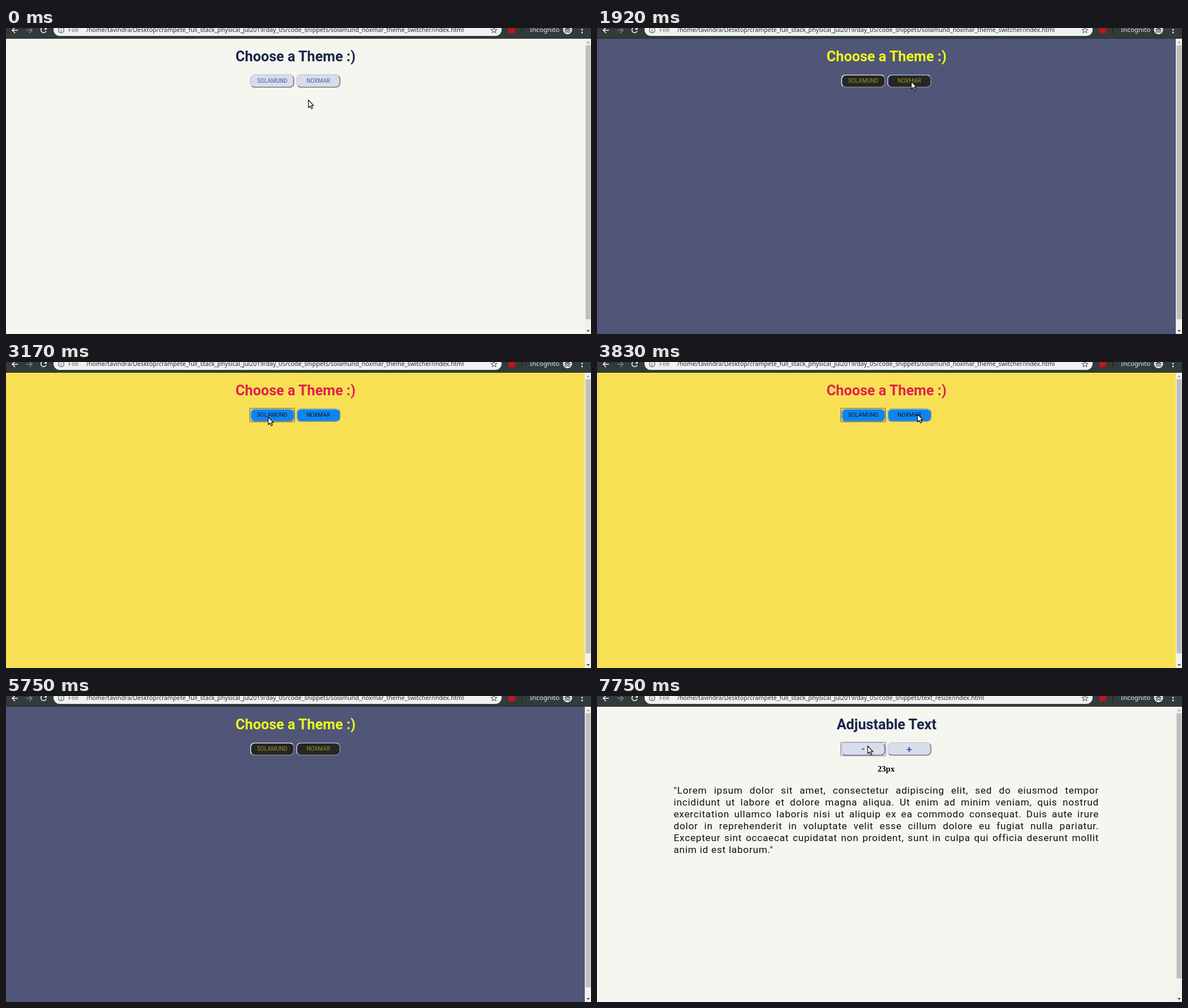
An HTML page with a canvas for the animation above (8 s loop, 1034 px wide and 542 px high).

```html
<!DOCTYPE html>
<html lang="en">
<head>
<meta charset="utf-8">
<title>Theme switcher</title>
<style>
  html, body { margin: 0; width: 1034px; height: 542px; overflow: hidden; }
  canvas, svg { position: absolute; left: 0; top: 0; }
  text { white-space: pre; }
  .bar { font-family: "Noto Sans", sans-serif; }
  .title { font: 700 25.2px Roboto, sans-serif; }
  .label { font: 400 10px Roboto, sans-serif; }
  .sign { font: 700 17px Roboto, sans-serif; }
  .size { font: 700 14.6px "Liberation Serif", serif; }
  .body { font-family: Roboto, sans-serif; letter-spacing: .042em; fill: #111; }
</style>
</head>
<body>
<canvas id="stage" width="1034" height="542"></canvas>
<svg id="layer" width="1034" height="542" viewBox="0 0 1034 542"></svg>
<script>
const LOOP = 8000;
const ctx = document.getElementById('stage').getContext('2d');
const layer = document.getElementById('layer');

const themes = {
  light: { bg: '#f5f6f0', title: '#192549', btn: '#d9dcea', label: '#3f61a5',
           lit: '#d9dae2', dark: '#777780', ring: '#7286b4' },
  night: { bg: '#515578', title: '#eaff1a', btn: '#262626', label: '#96961f',
           lit: '#ececec', dark: '#8a8a86', focusLit: '#a9c8f0', pressLit: '#6386a2' },
  sunny: { bg: '#f8e055', title: '#e0204c', btn: '#0d86f0', label: '#10182a',
           lit: '#d9cf86', dark: '#7f8694', ring: '#766d48' }
};

// Page state by start time; focus and pressed are button indexes.
const states = [
  { at: 0, theme: 'light' },
  { at: 1880, theme: 'light', focus: 1, pressed: 1 },
  { at: 1920, theme: 'night', focus: 1 },
  { at: 3080, theme: 'night', focus: 0, pressed: 0 },
  { at: 3170, theme: 'sunny', focus: 0 },
  { at: 5130, theme: 'night', focus: 1 },
  { at: 6380, theme: 'light', size: 24 },
  { at: 7630, theme: 'light', size: 24, focus: 0, pressed: 0 },
  { at: 7750, theme: 'light', size: 23, focus: 0 }
];

// Pointer moves: first step, last step, step count, points passed through.
const start = [534, 127];
const moves = [
  [420, 420, 1, [[534, 126]]],
  [630, 920, 4, [[556, 98]]],
  [1500, 1500, 1, [[554.5, 94]]],
  [2420, 2750, 4, [[572, 96], [463, 97]]],
  [3670, 3830, 3, [[578, 94], [566, 92]]],
  [5330, 5750, 6, [[562, 94], [500, -25]]],
  [6380, 6380, 1, [[640, -25]]],
  [6420, 7170, 9, [[491, 89]]],
  [7290, 7290, 1, [[478, 88]]]
];

function along(points, f) {
  const lens = points.slice(1).map((p, i) => Math.hypot(p[0] - points[i][0], p[1] - points[i][1]));
  let left = f * lens.reduce((a, b) => a + b, 0);
  for (let i = 0; i < lens.length; i++) {
    if (left <= lens[i] && lens[i]) {
      const u = left / lens[i];
      return points[i].map((v, j) => v + (points[i + 1][j] - v) * u);
    }
    left -= lens[i];
  }
  return points[points.length - 1];
}

function pointerAt(t) {
  let pos = start;
  for (const [t0, t1, n, path] of moves) {
    if (t < t0) break;
    const k = n === 1 ? 1 : Math.min(n, 1 + Math.floor((t - t0) / (t1 - t0) * (n - 1) + 1e-6));
    pos = k === n ? path[path.length - 1]
                  : along([pos, ...path], Math.sin(k / n * Math.PI / 2));
  }
  return pos;
}

function node(name, attrs, parent = layer) {
  const el = document.createElementNS('http://www.w3.org/2000/svg', name);
  for (const key in attrs) el.setAttribute(key, attrs[key]);
  parent.appendChild(el);
  return el;
}

function text(str, x, y, cls, attrs = {}) {
  const el = node('text', { x, y, class: cls, ...attrs });
  el.textContent = str;
  return el;
}

const centred = { 'text-anchor': 'middle' };
const root = '/home/tavindra/Desktop/crampete_full_stack_physical_jul2019/day_05/code_snippets/';

text('File', 110, 7, 'bar', { 'font-size': 11.6, fill: '#6b7072' });
text('Incognito', 926, 7, 'bar', { 'font-size': 11.6, fill: '#e4e7e7' });
const url = text('', 142, 7, 'bar', { 'font-size': 10.7, fill: '#25292b' });
const title = text('', 511.8, 58.5, 'title', centred);
const labels = [470.5, 552].map(x => text('', x, 97.5, 'label', centred));
const sizeText = text('', 511, 133.5, 'size', centred);

const lorem = [
  '"Lorem ipsum dolor sit amet, consectetur adipiscing elit, sed do eiusmod tempor',
  'incididunt ut labore et dolore magna aliqua. Ut enim ad minim veniam, quis nostrud',
  'exercitation ullamco laboris nisi ut aliquip ex ea commodo consequat. Duis aute irure',
  'dolor in reprehenderit in voluptate velit esse cillum dolore eu fugiat nulla pariatur.'
];
const endings = {
  24: ['Excepteur sint occaecat cupidatat non proident, sunt in culpa qui officia deserunt',
       'mollit anim id est laborum."'],
  23: ['Excepteur sint occaecat cupidatat non proident, sunt in culpa qui officia deserunt mollit',
       'anim id est laborum."']
};

function paragraph(size, top, step) {
  const group = node('g', { 'font-size': size * 0.75 });
  const lines = [...lorem, ...endings[size]];
  lines.forEach((line, i) => {
    const el = text(line, 135.5, top + i * step, 'body');
    group.appendChild(el);
    if (i < lines.length - 1) {
      const gap = (751.5 - el.getComputedTextLength()) / (line.split(' ').length - 1);
      el.style.wordSpacing = gap + 'px';
    }
  });
  return group;
}
const paragraphs = { 24: paragraph(24, 174, 21.95), 23: paragraph(23, 173, 21.05) };

const pointer = node('path', {
  d: 'M.5 .5V14L3.6 11.2L5.9 16L8 15L5.8 10.3H9.7Z',
  fill: '#fff', stroke: '#111', 'stroke-width': 1.2, 'stroke-linejoin': 'round'
});

function rect(x, y, w, h, color, r = 0) {
  ctx.fillStyle = color;
  ctx.beginPath();
  ctx.roundRect(x, y, w, h, r);
  ctx.fill();
}

function disc(x, y, r, color) {
  ctx.fillStyle = color;
  ctx.beginPath();
  ctx.arc(x, y, r, 0, 7);
  ctx.fill();
}

function poly(points, color, width, close) {
  ctx.beginPath();
  points.forEach(([x, y]) => ctx.lineTo(x, y));
  if (close) ctx.closePath();
  if (width) {
    ctx.strokeStyle = color;
    ctx.lineWidth = width;
    ctx.stroke();
  } else {
    ctx.fillStyle = color;
    ctx.fill();
  }
}

function arc(x, y, r, from, to, color, width) {
  ctx.beginPath();
  ctx.arc(x, y, r, from, to);
  ctx.strokeStyle = color;
  ctx.lineWidth = width;
  ctx.stroke();
}

function arrow(x, y, dir, color) {
  poly([[x - 5 * dir, y], [x + 5 * dir, y]], color, 1.6);
  poly([[x, y - 5], [x + 5 * dir, y], [x, y + 5]], color, 1.6);
}

function toolbar() {
  rect(0, 0, 1034, 19, '#323a3a');
  rect(0, 18, 1034, 1, '#2a3131');
  arrow(16, 4, -1, '#f1f3f3');
  arrow(41, 4, 1, '#7d8484');
  arc(66.5, 3.5, 4.8, 0.4, 5.3, '#f1f3f3', 1.6);
  poly([[72, -2], [72, 3], [67, 3]], '#f1f3f3');
  rect(84, -8, 792, 22, '#eff2f0', 11);

  arc(97.5, 3.5, 4.9, 0, 7, '#5f6568', 1.2);
  rect(96.9, 2.8, 1.3, 3.6, '#5f6568');
  rect(96.9, 0.5, 1.3, 1.3, '#5f6568');

  const star = Array.from({ length: 10 }, (_, i) => {
    const a = i * Math.PI / 5 - Math.PI / 2, r = i % 2 ? 2.4 : 5.4;
    return [862.5 + r * Math.cos(a), 4 + r * Math.sin(a)];
  });
  poly(star, '#5a6063', 1.1, true);

  rect(888, -3, 12, 12, '#c1141c');
  rect(911, 0, 1, 10, '#161b1b');

  // private window badge: hat and glasses
  disc(992.5, 3, 8, '#f1f3f3');
  rect(986.5, 2, 12, 1.3, '#3a4242');
  poly([[989, 1.5], [990, -3], [995, -3], [996, 1.5]], '#3a4242');
  arc(990, 6.2, 1.7, 0, 7, '#3a4242', 1.1);
  arc(995, 6.2, 1.7, 0, 7, '#3a4242', 1.1);
  for (const y of [-2, 3, 8]) disc(1018.2, y, 1.4, '#f1f3f3');
}

function scrollbar(end) {
  rect(1023, 19, 11, 523, '#f1f1f0');
  rect(1024.5, 30.5, 9, end - 30.5, '#bfc0bd');
  poly([[1026, 27], [1029, 23.5], [1032, 27]], '#a5a5a5');
  poly([[1026, 535], [1029, 538.5], [1032, 535]], '#505050');
}

function button(x, c, focus, pressed) {
  const y = 82.5, w = 78, h = 23, m = h / 2;
  let lit = focus && c.focusLit || c.lit, dark = c.dark;
  if (pressed) [lit, dark] = [c.pressLit || c.dark, c.lit];
  rect(x, y, w, h, c.btn, 8);
  const edge = color => {
    ctx.beginPath();
    ctx.roundRect(x + 0.8, y + 0.8, w - 1.6, h - 1.6, 7);
    ctx.strokeStyle = color;
    ctx.lineWidth = 1.6;
    ctx.stroke();
  };
  edge(dark);
  ctx.save();
  ctx.beginPath();
  [[x, y + h], [x, y], [x + w, y], [x + w - m, y + m], [x + m, y + m]]
    .forEach(p => ctx.lineTo(...p));
  ctx.clip();
  edge(c.btn);
  edge(lit);
  ctx.restore();
  if (focus && c.ring) {
    ctx.strokeStyle = c.ring;
    ctx.lineWidth = 1.2;
    ctx.beginPath();
    ctx.roundRect(x - 0.5, y - 0.5, w + 1, h + 1, 1);
    ctx.stroke();
  }
}

function setText(el, str) {
  if (el.textContent !== str) el.textContent = str;
}

function draw() {
  const t = performance.now() % LOOP;
  const s = states.filter(item => item.at <= t).pop();
  const c = themes[s.theme];

  rect(0, 0, 1034, 542, c.bg);
  toolbar();
  scrollbar(s.size ? 523 - s.size : 516);
  [431.5, 513].forEach((x, i) => button(x, c, s.focus === i, s.pressed === i));

  setText(url, root + (s.size ? 'text_resize' : 'solamund_noxmar_theme_switcher') + '/index.html');
  setText(title, s.size ? 'Adjustable Text' : 'Choose a Theme :)');
  title.setAttribute('fill', c.title);
  const names = s.size ? ['-', '+'] : ['SOLAMUND', 'NOXMAR'];
  labels.forEach((el, i) => {
    setText(el, names[i]);
    el.setAttribute('class', s.size ? 'sign' : 'label');
    el.setAttribute('y', s.size ? 98.5 + i : 97.3);
    el.setAttribute('fill', c.label);
  });
  setText(sizeText, s.size ? s.size + 'px' : '');
  for (const size in paragraphs) {
    paragraphs[size].setAttribute('visibility', +size === s.size ? 'visible' : 'hidden');
  }

  const [x, y] = pointerAt(t).map(Math.round);
  pointer.setAttribute('transform', `translate(${x} ${y})`);
  requestAnimationFrame(draw);
}
draw();
</script>
</body>
</html>
```
